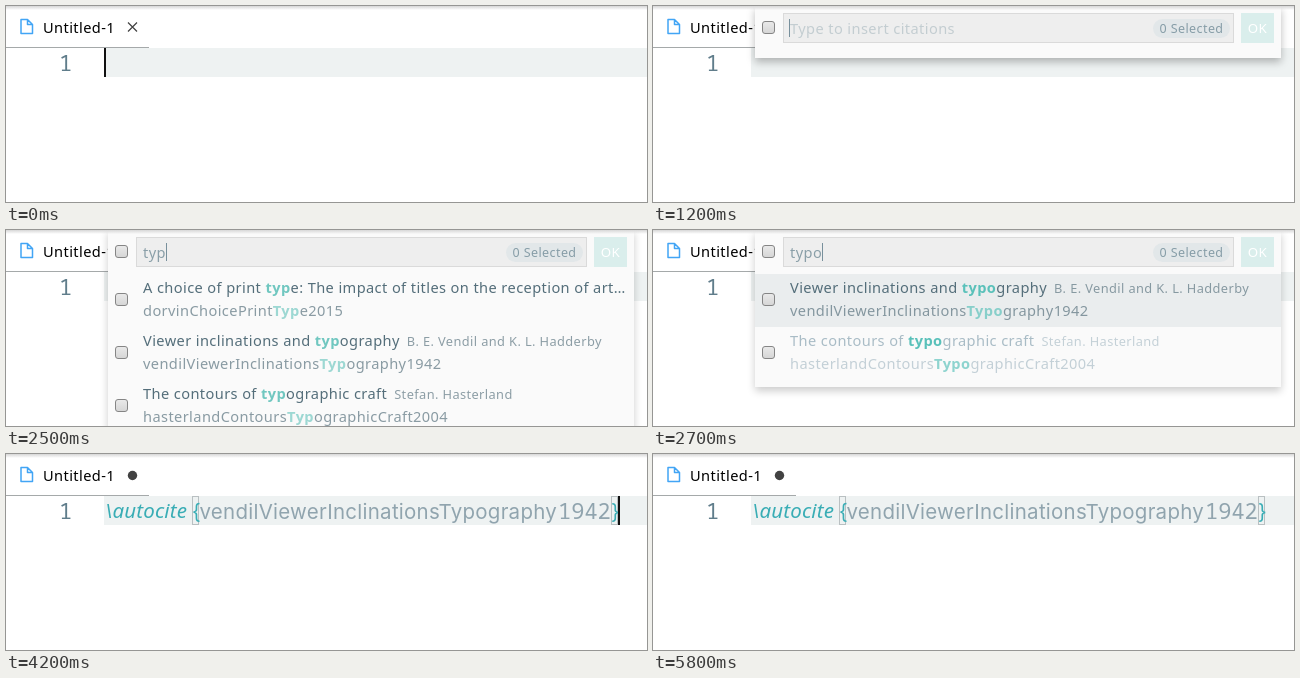
Animation of 641 by 196 pixels, one loop 6.5 s. Source, as an HTML page:

```html
<!DOCTYPE html>
<html lang="en">
<head>
<meta charset="utf-8">
<title>Insert citation</title>
<style>
html, body { margin: 0; width: 100%; height: 100%; overflow: hidden; background: #fff; }
body { position: relative; font: 14.6px/26.4px "Noto Sans", sans-serif; letter-spacing: .4px; color: #546e7a; white-space: pre; }
.abs, .panel, .field, .box, .row, .caret, .cursor, .key { position: absolute; box-sizing: border-box; }
.t { animation: 6.5s step-end infinite; }

/* editor */
.top { inset: 0 0 auto; height: 4px; background: linear-gradient(#d6d6d6, #fff0); }
.tab { left: 37px; top: 8px; color: #000; }
.rule { left: 0; top: 41px; width: 143px; height: 1px; background: #a5a9aa; }
.line { left: 98px; top: 42px; right: 0; height: 29px; background: #eef2f2; }
.mono { font: 22px/29px "Noto Sans Mono", monospace; top: 42px; letter-spacing: 0; }
.code { font: 20.5px/29px Inter, sans-serif; top: 43px; letter-spacing: .25px; }
.macro { font: italic 20.5px/29px "Noto Sans", sans-serif; top: 42px; letter-spacing: .15px; }
.cmd { color: #39adb5; }
.cite { color: #90a4ae; }
.pair { top: 42px; width: 7px; height: 29px; border: 1px solid #b9c0c2; }
.cursor { top: 42px; width: 2px; height: 29px; background: #111; }
.close { animation-name: close; }
.done { animation-name: done; }
.start { left: 98px; animation-name: start; }
.end { left: 612px; animation-name: blink; }

/* quick input */
.panel { left: 102px; top: 0; width: 526px; background: #fafafa; box-shadow: 0 3px 8px #0003; }
.field { top: 7px; height: 30px; background: #eee; border: 1px solid #dadada; }
.caret { top: 13px; width: 1px; height: 18px; background: #78909c; }
.palette { height: 220px; animation-name: palette; }
.palette .row { left: 0; width: 526px; height: 26.4px; padding-left: 14px; }
.recent { right: 22px; color: #80cbc4; }
.first { background: #eceeef; animation-name: wake; }
.third { animation-name: wake-faint; }
.key { top: 2px; height: 22px; font-size: 12.4px; line-height: 19px; text-align: center; background: #eee; border: 1px solid #d0d0d0; border-bottom-color: #b8b8b8; border-radius: 3px; }
.plus { font-size: 14px; }

/* citation picker */
.picker { animation-name: picker; }
.box { left: 7px; width: 13px; height: 13px; background: linear-gradient(#e9e9e9, #d6d6d6); border: 1px solid #858585; border-radius: 3px; }
.hint { left: 35px; top: 9px; color: #c3cdd1; animation-name: hint; }
.typed { left: 35px; top: 9px; color: #8a9fa8; }
.k1 { animation-name: k1; } .k2 { animation-name: k2; }
.k3 { animation-name: k3; } .k4 { animation-name: k4; }
.picker .caret { animation-name: caret; }
.count { left: 398px; top: 13px; width: 77px; height: 19px; border-radius: 10px; background: #e2e7e9; color: #869da7; font-size: 12.5px; line-height: 19px; text-align: center; }
.ok { left: 486px; top: 7px; width: 33px; height: 30px; background: #daeeec; color: #fff; font-size: 13.3px; line-height: 31px; text-align: center; }
.list { left: 0; top: 44px; width: 526px; }
.found { animation-name: found; }
.fewer { animation-name: fewer; }
.list .row { left: 0; width: 526px; height: 53px; }
.list .box { top: 19px; }
.title { left: 35px; top: 0; }
.id { left: 35px; top: 23px; opacity: .68; }
.by { font-size: 12.8px; margin-left: 7px; opacity: .66; }
.row b { color: #5ac1ba; }
.found b { color: #70c7c0; }
.picked { background: #eaedee; animation-name: picked; }
.faint { color: #a9bcc6; }

@keyframes close { 0% { opacity: 1 } 64.61% { opacity: 0 } }
@keyframes done { 0% { opacity: 0 } 64.61% { opacity: 1 } }
@keyframes start { 0% { opacity: 1 } 10.76% { opacity: 0 } }
@keyframes blink {
  0% { opacity: 0 } 64.61% { opacity: 1 }
  73.84% { opacity: .75 } 75.38% { opacity: .5 } 76.92% { opacity: .25 } 78.46% { opacity: 0 }
  81.53% { opacity: .25 } 83.07% { opacity: .5 } 84.61% { opacity: .75 } 86.15% { opacity: 1 }
  89.23% { opacity: 0 }
}
@keyframes palette { 0% { opacity: 0 } 9.23% { opacity: 1 } 16.92% { opacity: 0 } }
@keyframes wake { 0% { color: #90a4ae } 10.76% { color: #546e7a } }
@keyframes wake-faint { 0% { color: #b2c4ce } 10.76% { color: #546e7a } }
@keyframes picker {
  0% { opacity: 0; height: 52px; box-shadow: none }
  16.92% { opacity: 1; height: 52px; box-shadow: none }
  18.46% { opacity: 1; height: 52px; box-shadow: 0 4px 8px #0004 }
  38.46% { opacity: 1; height: 220px; box-shadow: 0 3px 8px #0003 }
  41.53% { opacity: 1; height: 157px; box-shadow: 0 4px 8px #0003 }
  64.61% { opacity: 0 }
}
@keyframes hint { 0% { opacity: 1 } 33.84% { opacity: 0 } }
@keyframes k1 { 0% { opacity: 0 } 33.84% { opacity: 1 } }
@keyframes k2 { 0% { opacity: 0 } 35.38% { opacity: 1 } }
@keyframes k3 { 0% { opacity: 0 } 36.92% { opacity: 1 } }
@keyframes k4 { 0% { opacity: 0 } 39.99% { opacity: 1 } }
@keyframes caret {
  0% { left: 34px; opacity: 1 } 26.15% { left: 34px; opacity: 0 }
  33.84% { left: 41px; opacity: 1 } 35.38% { left: 49px; opacity: 1 }
  36.92% { left: 58px; opacity: 1 } 39.99% { left: 67px; opacity: 1 }
  47.69% { left: 67px; opacity: 0 }
}
@keyframes found { 0% { opacity: 0 } 38.46% { opacity: 1 } 41.53% { opacity: 0 } }
@keyframes fewer { 0% { opacity: 0 } 41.53% { opacity: 1 } }
@keyframes picked { 0% { color: #546e7a } 52.3% { color: #8a9fa9 } }
</style>
</head>
<body>
<svg class="abs" style="left:0;top:0" width="142" height="40" fill="none">
  <path d="M15 13.500h6.500l5 5v9h-11.500zM21.500 13.500v5h5" stroke="#42a5f5" stroke-width="1.5" stroke-linejoin="round"/>
  <path class="t close" d="M122 16.500l9 9m0-9l-9 9" stroke="#424242" stroke-width="1.2"/>
  <circle class="t done" cx="126.500" cy="21.500" r="4.700" fill="#424242"/>
</svg>
<div class="abs tab">Untitled-1</div>
<div class="abs rule"></div>
<div class="abs line"></div>
<div class="abs mono" style="left:53px;color:#607d8b">1</div>
<div class="cursor t start"></div>

<div class="abs t done" style="inset:0">
  <div class="abs pair" style="left:186px"></div>
  <div class="abs pair" style="left:605px"></div>
  <span class="abs macro cmd" style="left:99px">\autocite</span>
  <span class="abs code cmd" style="left:186px">{</span>
  <span class="abs code cite" style="left:193.5px">vendilViewerInclinationsTypography</span>
  <span class="abs mono cite" style="left:552px">1942</span>
  <span class="abs code cmd" style="left:605px">}</span>
</div>
<div class="cursor t end"></div>

<div class="panel palette t">
  <div class="field" style="left:7px;width:512px"></div>
  <span class="abs" style="left:13px;top:9px;color:#78909c">&gt;</span>
  <div class="caret" style="left:22px"></div>
  <div class="row first t" style="top:44.6px">LaTeX Workshop: Cite from Zotero<span class="abs recent">recently used</span></div>
  <div class="row" style="top:71px">Preferences: Color Theme<span class="key" style="left:347px;width:37px">Ctrl</span><span class="abs plus" style="left:386px">+</span><span class="key" style="left:398px;width:22px">K</span><span class="key" style="left:432px;width:37px">Ctrl</span><span class="abs plus" style="left:471px">+</span><span class="key" style="left:483px;width:22px">T</span></div>
  <div class="row third t" style="top:97.4px">Show Release Notes</div>
  <div class="row" style="top:123.8px">Preferences: Open Keyboard Shortcuts (JSON)</div>
  <div class="row" style="top:150.2px">Open SVG Editor</div>
  <div class="row" style="top:176.6px">LaTeX Workshop: Open in Zotero</div>
</div>

<div class="panel picker t">
  <div class="box" style="top:15px"></div>
  <div class="field" style="left:28px;width:451px"></div>
  <div class="abs hint t">Type to insert citations</div>
  <div class="abs typed"><span class="t k1">t</span><span class="t k2">y</span><span class="t k3">p</span><span class="t k4">o</span></div>
  <div class="caret t"></div>
  <div class="abs count">0 Selected</div>
  <div class="abs ok">OK</div>

  <div class="abs list found t">
    <div class="row" style="top:0">
      <div class="box"></div>
      <div class="abs title">A choice of print <b>typ</b>e: The impact of titles on the reception of art…</div>
      <div class="abs id">dorvinChoicePrint<b>Typ</b>e2015</div>
    </div>
    <div class="row" style="top:53px">
      <div class="box"></div>
      <div class="abs title">Viewer inclinations and <b>typ</b>ography<span class="by">B. E. Vendil and K. L. Hadderby</span></div>
      <div class="abs id">vendilViewerInclinations<b>Typ</b>ography1942</div>
    </div>
    <div class="row" style="top:106px">
      <div class="box"></div>
      <div class="abs title">The contours of <b>typ</b>ographic craft<span class="by">Stefan. Hasterland</span></div>
      <div class="abs id">hasterlandContours<b>Typ</b>ographicCraft2004</div>
    </div>
  </div>

  <div class="abs list fewer t">
    <div class="row picked t" style="top:0">
      <div class="box"></div>
      <div class="abs title">Viewer inclinations and <b>typo</b>graphy<span class="by">B. E. Vendil and K. L. Hadderby</span></div>
      <div class="abs id">vendilViewerInclinations<b>Typo</b>graphy1942</div>
    </div>
    <div class="row faint" style="top:53px">
      <div class="box"></div>
      <div class="abs title">The contours of <b>typo</b>graphic craft<span class="by">Stefan. Hasterland</span></div>
      <div class="abs id">hasterlandContours<b>Typo</b>graphicCraft2004</div>
    </div>
  </div>
</div>
<div class="abs top"></div>
</body>
</html>
```
